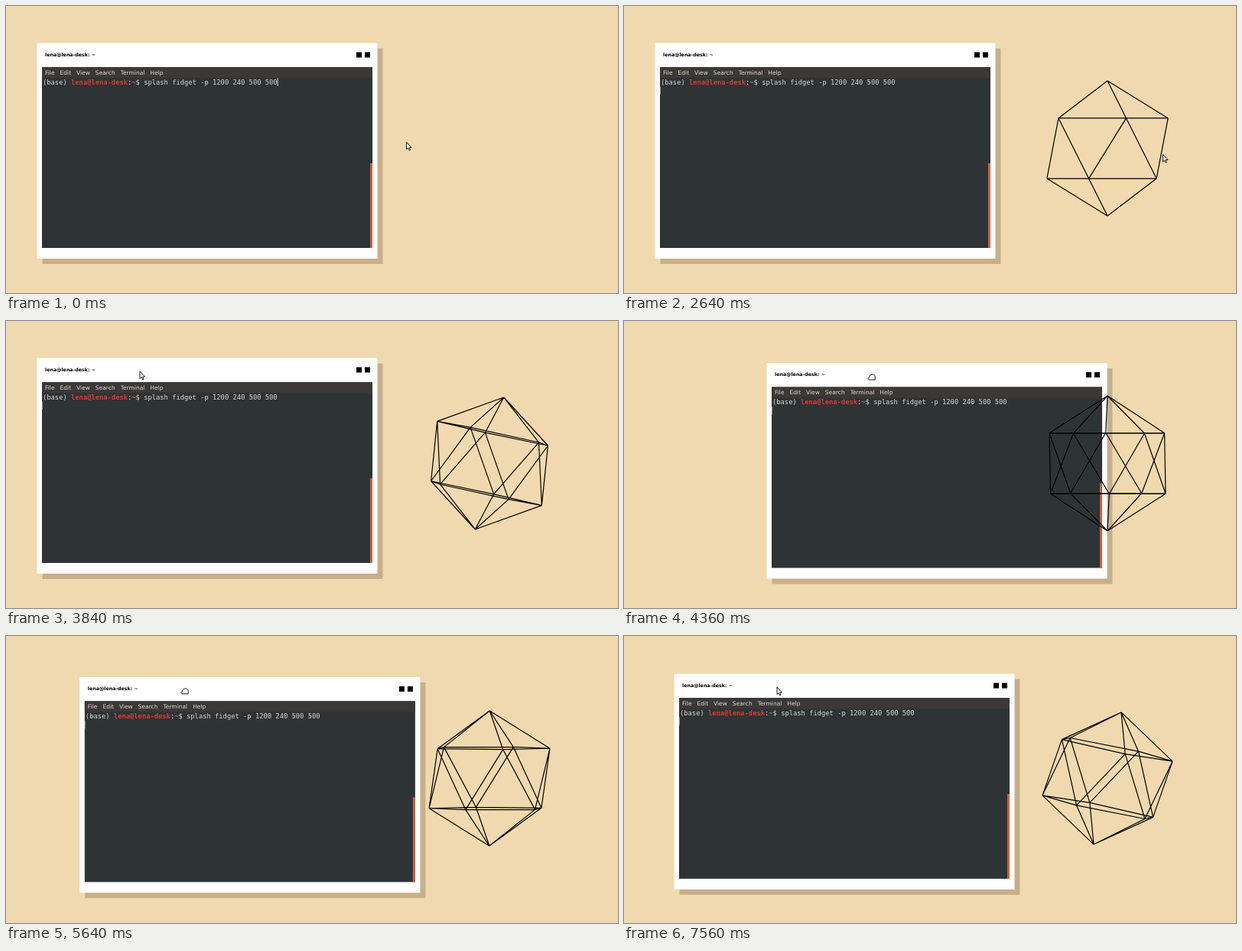
Animation, 800 px wide and 376 px high, one loop 7.6 s. Source, as an HTML page with a canvas:

```html
<!DOCTYPE html>
<html lang="en">
<head>
<meta charset="utf-8">
<title>Fidget</title>
<style>
  html, body { margin: 0; width: 100%; height: 100%; overflow: hidden; background: #f0d9af; }
  canvas { display: block; }
</style>
</head>
<body>
<canvas id="stage" width="800" height="376"></canvas>
<script>
const ctx = document.getElementById('stage').getContext('2d');
const LOOP = 7600, ENTER = 1520, SPLASH = 1920, FLICK = 3120, GRAB = 3840, DROP = 6900;
const DEG = Math.PI / 180;

// Key points: time in ms, then values
const windowPath = [[GRAB, 40.5, 48.5], [4360, 186.5, 55], [5120, 122.5, 52.5], [6240, 74.5, 55.5], [6640, 65.5, 49.5]];
const mousePath = [[0, 523, 178], [400, 77, 50], [1120, 510, 230], [ENTER, 510, 230],
  [2600, 704, 194], [FLICK, 704, 194], [3400, 25, 64], [GRAB, 174.5, 65.5]];
const spinPath = [[FLICK, 0], [GRAB, 189], [4360, 357], [5120, 590], [6240, 888], [LOOP, 1240]];

// Monotone cubic curve through the key points
function along(path, t) {
  const last = path.length - 1;
  if (t <= path[0][0]) return path[0].slice(1);
  if (t >= path[last][0]) return path[last].slice(1);
  const i = path.findIndex(p => p[0] > t) - 1;
  const h = path[i + 1][0] - path[i][0], u = (t - path[i][0]) / h, v = 1 - u;
  return path[i].slice(1).map((from, n) => {
    const slope = j => (path[j + 1][n + 1] - path[j][n + 1]) / (path[j + 1][0] - path[j][0]);
    const tangent = j => {
      if (j === 0) return 0;
      if (j === last) return slope(j - 1) / 2;
      const a = slope(j - 1), b = slope(j);
      return a * b > 0 ? 2 * a * b / (a + b) : 0;
    };
    return v * v * (1 + 2 * u) * from + u * u * (3 - 2 * u) * path[i + 1][n + 1]
      + h * u * v * (v * tangent(i) - u * tangent(i + 1));
  });
}

function at(x, y, draw) {
  ctx.save();
  ctx.translate(x, y);
  draw();
  ctx.restore();
}

function rect(color, x, y, w, h) {
  ctx.fillStyle = color;
  ctx.fillRect(x, y, w, h);
}

// Returns the right end of the text
function text(str, x, y, font, color) {
  ctx.font = font;
  ctx.fillStyle = color;
  ctx.fillText(str, x, y);
  return x + ctx.measureText(str).width;
}

function drawWindow(entered) {
  const sans = '"DejaVu Sans", sans-serif', mono = '8.79px "DejaVu Sans Mono", monospace';
  const user = 'lena@lena-desk', pale = '#d3d7cf';
  rect('#c8af8a', 7, 7, 445, 282.5);
  rect('#fff', 0, 0, 445, 282.5);
  text(user + ': ~', 10.5, 17.5, 'bold 6.3px ' + sans, '#000');
  for (const x of [417.5, 428.5]) rect('#000', x, 12, 7, 7);

  rect('#2e3436', 6.5, 31.5, 432, 237);
  rect('#3c3836', 6.5, 31.5, 432, 14);
  rect('#d0603a', 435.5, 157.5, 3, 111);
  let x = 10.5;
  for (const label of ['File', 'Edit', 'View', 'Search', 'Terminal', 'Help'])
    x = text(label, x, 41.5, '7.5px ' + sans, '#dfdbd2') + 7;

  x = text('(base) ', 7.5, 54.5, mono, pale);
  x = text(user, x, 54.5, 'bold ' + mono, '#dc3b33');
  x = text(':', x, 54.5, mono, pale);
  x = text('~', x, 54.5, mono, '#dd8160');
  x = text('$ splash fidget -p 1200 240 500 500', x, 54.5, mono, pale);
  if (entered) rect('#8b8f8e', 6.5, 57, 1, 10.5);
  else rect(pale, x, 46, 1, 10.5);
}

// Icosahedron standing on a vertex: two poles and a zigzag belt
const RADIUS = 88.5, BELT = RADIUS / Math.sqrt(5);
const vertices = [[0, -RADIUS, 0], [0, RADIUS, 0]];
for (let k = 0; k < 10; k++) {
  const a = k * 36 * DEG;
  vertices.push([2 * BELT * Math.cos(a), k % 2 ? BELT : -BELT, 2 * BELT * Math.sin(a)]);
}
const adjacent = (p, q) => Math.hypot(p[0] - q[0], p[1] - q[1], p[2] - q[2]) < RADIUS * 1.1;

function rotate(a, b, angle) {
  const c = Math.cos(angle * DEG), s = Math.sin(angle * DEG);
  return [a * c - b * s, a * s + b * c];
}
const tilt = ([x, y, z], angle) => [...rotate(x, y, angle), z];
function turn([x, y, z], angle) {
  [x, z] = rotate(x, z, angle);
  return [x, y, z];
}

function drawSolid(spin) {
  const lean = 6.16, twist = -17 * Math.min(1, spin / 50);
  const points = vertices.map(v => tilt(turn(tilt(turn(v, twist), -lean), spin), lean));
  ctx.beginPath();
  vertices.forEach((p, i) => vertices.forEach((q, j) => {
    if (i >= j || !adjacent(p, q)) return;
    ctx.moveTo(points[i][0], points[i][1]);
    ctx.lineTo(points[j][0], points[j][1]);
  }));
  ctx.strokeStyle = '#000';
  ctx.lineWidth = 1.2;
  ctx.lineJoin = 'round';
  ctx.stroke();
}

const arrow = new Path2D('M.5.5V10L2.7 8L4.2 11.3L5.6 10.6L4.2 7.5H7Z');
const fist = new Path2D('M0 5C-2.2 4-2 1.8.3 1.8C.4-.9 2.3-2.4 3.5-1.7C5-2.6 6-1.8 6.5-1.1C7.6-1.3 7.8.2 7.8 2V5Z');

function drawMouse(shape) {
  ctx.fillStyle = '#fff';
  ctx.strokeStyle = '#000';
  ctx.lineWidth = 0.9;
  ctx.fill(shape);
  ctx.stroke(shape);
}

const start = performance.now();
function frame() {
  const t = (performance.now() - start) % LOOP;
  const [wx, wy] = along(windowPath, t);
  const [mx, my] = t < GRAB ? along(mousePath, t) : [wx + 134, wy + 17];
  rect('#f0d9af', 0, 0, 800, 376);
  at(wx, wy, () => drawWindow(t >= ENTER));
  if (t >= SPLASH) at(632, 186.5, () => drawSolid(along(spinPath, t)[0]));
  at(mx, my, () => drawMouse(t > GRAB + 20 && t < DROP ? fist : arrow));
  requestAnimationFrame(frame);
}
frame();
</script>
</body>
</html>
```
